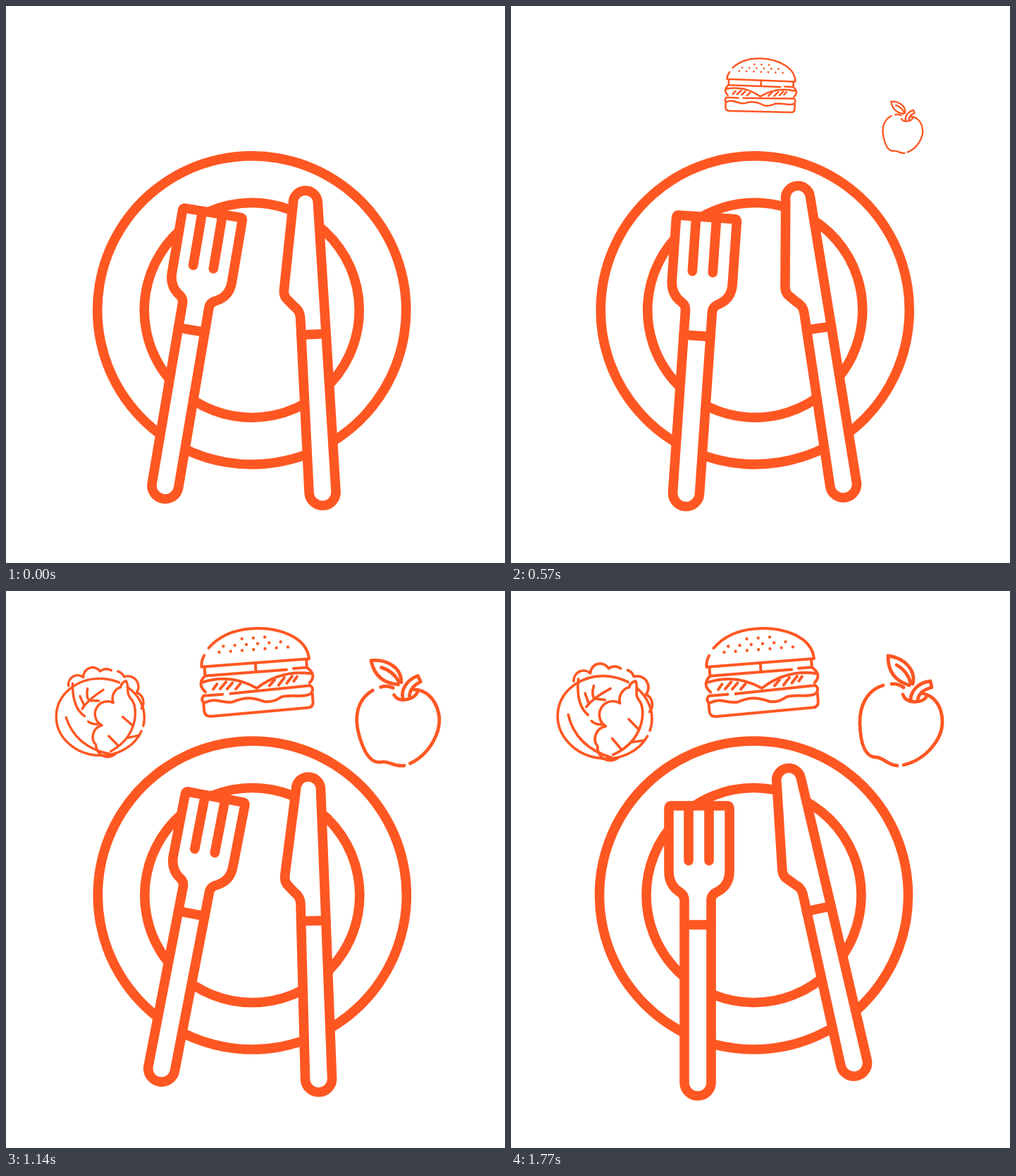
These frames come from a looping animation (708 by 791 pixels, 1800 ms). An HTML page:

```html
<!DOCTYPE html>
<html lang="en">
<head>
<meta charset="utf-8">
<title>Plate and food</title>
<style>
html, body { margin: 0; width: 100%; height: 100%; overflow: hidden; background: #fff; }
svg { display: block; width: 708px; height: 791px; fill: none; stroke: #ff5722; stroke-linecap: round; stroke-linejoin: round; }
.solid { fill: #fff; }
</style>
</head>
<body>
<svg viewBox="0 0 708 791">
  <g id="plate" stroke-width="13.6">
    <circle cx="344.5" cy="432" r="219"/>
    <circle cx="344.5" cy="432" r="152.5"/>
    <g id="fork">
      <path class="solid" d="M227 305H307Q310 305 310 309V398Q310 418 293 427Q284 431 284 439V698A19 19 0 0 1 246 698V439Q246 432 240 428Q224 418 224 398V309Q224 305 227 305Z"/>
      <path d="M252 305V383M281 305V383M246 474H284"/>
    </g>
    <g id="knife" transform="rotate(-12 347 457) translate(-1.3 0)">
      <path class="solid" d="M416 283A17.500 17.500 0 0 1 451 283L455 470L459.500 694A19 19 0 0 1 421.500 695L419.500 445Q419 435 411 429L401 418Q397 413 398 405Z"/>
      <path d="M419.500 470H455"/>
    </g>
  </g>

  <g id="burger" stroke-width="4">
    <path id="bun" d="M283 86Q278 93 278 102H431C430 70 390 53 352 53Q313 53 290 76M277 153V164Q277 173 286 173L424 171Q432 171 432 163V152"/>
    <path id="seeds" stroke-width="4.400" stroke-dasharray="0 16.300" d="M338 66.500H371M311 75H395M304.500 83H403"/>
    <path id="cheese" d="M282 102V115H398M408 114H427V102M354.500 102V114"/>
    <path id="leaf" d="M282 115Q269 126 281 138M427 114Q441 126 429 136M277 124Q318 114 354 138Q390 114 432 123"/>
    <path id="hatch" d="M292 135l6-7m4 7l9-9m1 10l8-8m4 9l7-7M372 136l8-8m5 8l9-10m3 8l8-9m2 7l5-6"/>
    <path id="patty" d="M278 143H305M316 143L430 140M278 143Q272 150 279 153C295 146 302 156 318 155C340 147 352 153 364 158Q376 160 388 153C405 150 418 157 429 152Q436 146 430 140"/>
  </g>

  <g id="apple" stroke-width="4.800">
    <path id="body" d="M528 134C505 141 494 163 495 190C496 215 502 235 517 236C529 236 533 247 548 248M557 247C588 240 612 211 612 186C612 164 601 148 582 145M540 132Q549 131 557 137"/>
    <path id="stem" d="M567 155C567 142 578 130 595 128L597 137Q580 141 577 154M556 147C560 160 582 160 589 151M570 132C575 113 559 95 535 92Q534 124 565 134M547 105Q563 114 567 131"/>
  </g>

  <g id="lettuce" stroke-width="3.700">
    <ellipse cx="134" cy="179.500" rx="67" ry="58.500" pathLength="360" stroke-dasharray="10 8 277 13 52"/>
    <path class="lobes"/>
    <path id="left-leaf" d="M90 130Q91 167 110 179M116 187Q123 192 132 190M106 168Q114 154 137 138M113 137Q111 150 116 155M102 149L109 163M116 155H131"/>
    <path id="right-leaf" d="M163 133Q164 126 171 123C177 132 171 141 178 148Q187 156 187 174Q186 210 152 231M168 178L183 190M176 210L194 205M148 208L162 221M82 182Q98 226 150 235"/>
  </g>
</svg>
<script>
const LOOP = 1800, STEP = 30;
const poses = [0, 360, 600, 780, 990, 1320, 1590, 1770];

// Each part turns around x, y through the poses (degrees) and grows at a steady rate.
const parts = [
  { id: 'plate', x: 347, y: 457, turn: [9.6, 8.7, 3.6, 5.4, 8.9, 12, 6.3, 0] },
  { id: 'burger', x: 355, y: 112, start: 0, length: 900, turn: [3, 2.8, 2, .5, -3.7, -3.7, 0, -4.5] },
  { id: 'apple', x: 556, y: 172, start: 275, length: 610, turn: [-9, -9, -10, -10, -4.5, -21, -2, 0] },
  { id: 'lettuce', x: 134.5, y: 172, start: 580, length: 600, turn: [12, 12, 12, 10, 5, 0, 2, 7] }
];
for (const p of parts) p.node = document.getElementById(p.id);

// Rounded bumps between neighbouring points.
function lobes(points, radius, sweep) {
  return 'M' + points.map(p => p.join(' ')).join(`A${radius} ${radius} 0 0 ${sweep} `);
}
document.querySelector('.lobes').setAttribute('d',
  lobes([[84, 134], [106, 120], [131, 110], [148, 108]], 14, 1) +
  lobes([[158, 109], [168, 117], [188, 140], [196, 164]], 16, 1) +
  lobes([[163, 133], [153, 157], [137, 192], [129, 222], [160, 234]], 18, 0));

// Smooth curve through the poses.
function turnAt(v, t) {
  const last = poses.length - 1;
  if (t >= poses[last]) return v[last];
  const i = poses.findIndex(p => p > t) - 1;
  const slope = n => {
    const a = Math.max(n - 1, 0), b = Math.min(n + 1, last);
    return (v[b] - v[a]) / (poses[b] - poses[a]);
  };
  const d = poses[i + 1] - poses[i], u = (t - poses[i]) / d, w = 1 - u;
  return v[i] * w * w * (1 + 2 * u) + v[i + 1] * u * u * (3 - 2 * u)
    + d * u * w * (slope(i) * w - slope(i + 1) * u);
}

function sizeAt({ start, length }, t) {
  return length ? Math.min(Math.max((t - start) / length, 0), 1) : 1;
}

const begin = performance.now();
function draw() {
  const t = Math.floor((performance.now() - begin) % LOOP / STEP) * STEP;
  for (const p of parts) {
    const size = sizeAt(p, t);
    p.node.setAttribute('visibility', size > 0 ? 'visible' : 'hidden');
    p.node.setAttribute('transform',
      `translate(${p.x} ${p.y}) rotate(${turnAt(p.turn, t)}) scale(${size}) translate(${-p.x} ${-p.y})`);
  }
  requestAnimationFrame(draw);
}
draw();
</script>
</body>
</html>
```
